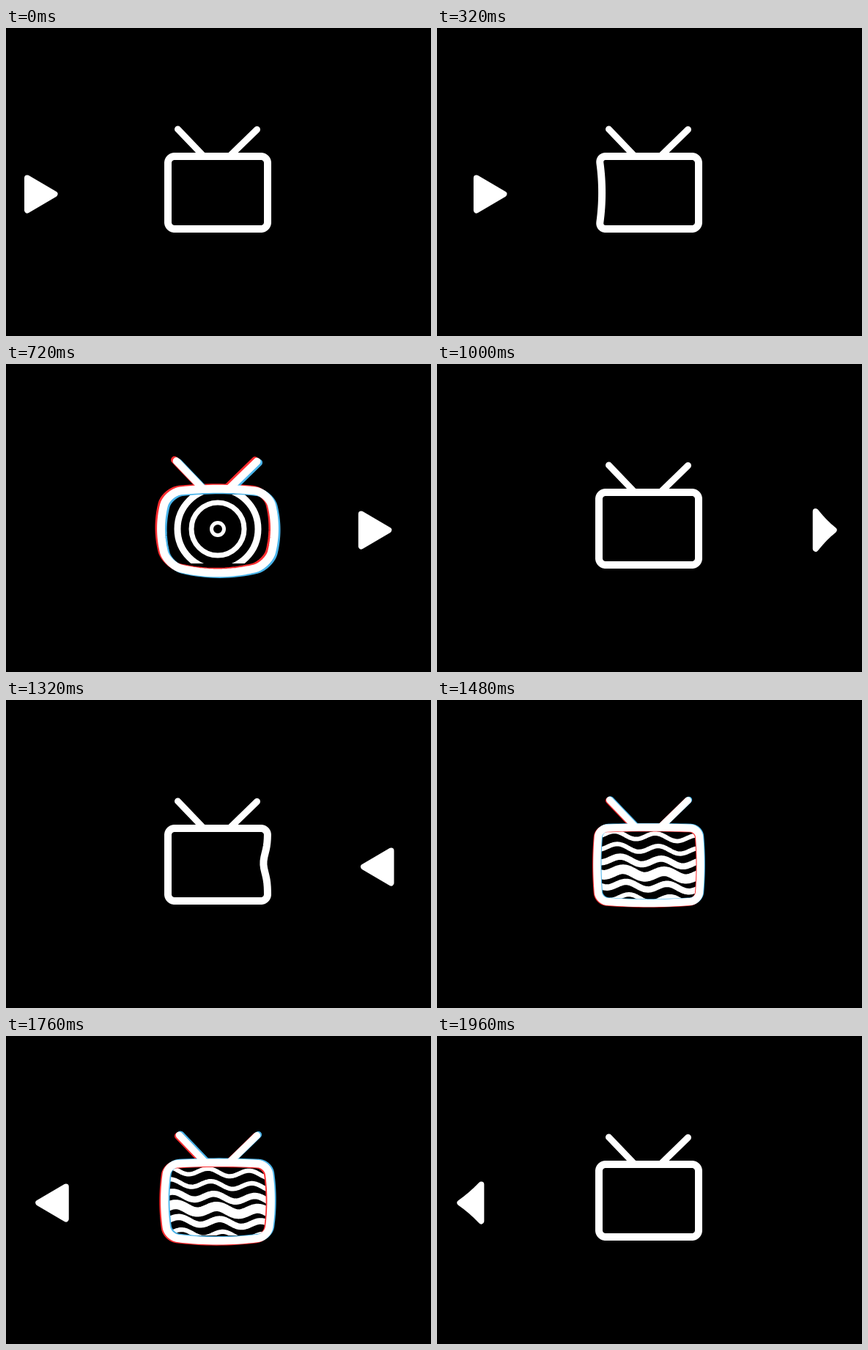
An HTML page with a canvas that plays this animation: 580 px wide and 420 px high, repeating every 2000 ms.

```html
<!DOCTYPE html>
<html lang="en">
<head>
<meta charset="utf-8">
<title>Play and television</title>
<style>
  html, body { margin: 0; width: 100%; height: 100%; overflow: hidden; background: #000; }
  canvas { display: block; }
</style>
</head>
<body>
<canvas id="stage" width="580" height="420"></canvas>
<script>
const ctx = document.getElementById('stage').getContext('2d');
const LOOP = 2000, STEP = 40, HALF = 1000, TURN = 160;
const CX = 289, CY = 224.5, HW = 68, HH = 49.5;

// The crossing to the right and the way back
const LEGS = [
  { dir: 1, x: 47.75, span: 482, y: 226.5, turn: 957, peak: 1.12, dent: 8, screen: drawRings },
  { dir: -1, x: 532, span: -489, y: 227.5, turn: 925, peak: .68, dent: 11, screen: drawWaves }
];

const clamp = v => Math.min(1, Math.max(0, v));

function ramp(from, to, t) {
  const s = clamp((t - from) / (to - from));
  return s * s * (3 - 2 * s);
}

// Slow drift plus a sharp dash with a softer stop
function travel(t) {
  const d = t - 470;
  const dash = d < 0 ? .476 * Math.exp(d / 47) : .9 - .424 * Math.exp(-d / 90);
  return t / 10000 + dash;
}

function drawPlay(leg, t) {
  const u = clamp((t - leg.turn) / TURN);
  const swell = Math.sin(Math.PI * u);
  const w = 18.75 * Math.cos(Math.PI * u) * leg.dir;
  const h = 22 * (1 + .21 * swell);
  const x = leg.x + leg.span * travel(t), y = leg.y;
  const pull = 4 * swell;
  ctx.beginPath();
  ctx.moveTo(x - w, y - h);
  ctx.quadraticCurveTo(x, y - h / 2 + pull, x + w, y);
  ctx.quadraticCurveTo(x, y + h / 2 - pull, x - w, y + h);
  ctx.closePath();
  ctx.lineWidth = 8;
  ctx.fill();
  ctx.stroke();
}

// Moves a point of the resting frame by the bulge and by the dent on the near side
function warp(x, y, leg, bulge, dent) {
  const u = x / HW, v = y / HH;
  const near = Math.max(0, -u * leg.dir);
  const bell = leg.dir > 0 ? 1 - v * v : Math.exp(-Math.pow((y + 2) / 19, 2));
  return [
    CX + x + 10 * bulge * u * (1 - v * v) + leg.dir * dent * near * bell,
    CY + y + (v < 0 ? 5 : 11.5) * bulge * v * (1 - u * u)
  ];
}

function framePath(leg, bulge, dent) {
  const r = 9 + 9 * bulge, arc = 10, cuts = 16;
  const points = [];
  [[1, -1], [1, 1], [-1, 1], [-1, -1]].forEach(([sx, sy], k) => {
    for (let i = 0; i <= arc; i++) {
      const a = (k - 1 + i / arc) * Math.PI / 2;
      points.push([sx * (HW - r) + r * Math.cos(a), sy * (HH - r) + r * Math.sin(a)]);
    }
  });
  const path = new Path2D();
  points.forEach(([x, y], i) => {
    const [nx, ny] = points[(i + 1) % points.length];
    for (let j = 0; j < cuts; j++) {
      const s = j / cuts;
      path.lineTo(...warp(x + (nx - x) * s, y + (ny - y) * s, leg, bulge, dent));
    }
  });
  path.closePath();
  return path;
}

function drawRings(t) {
  const grow = (t - 720) * .06;
  [8.5, 36, 55, 80].forEach((base, i) => {
    const r = base + grow * (.4 + base / 60);
    if (r <= 1) return;
    ctx.beginPath();
    ctx.arc(CX, 225, r, 0, 2 * Math.PI);
    ctx.lineWidth = 5 + 2 * i;
    ctx.stroke();
  });
}

function drawWaves(t) {
  const shift = (t - 640) * .12;
  for (let i = 0; i < 6; i++) {
    ctx.beginPath();
    for (let x = 210; x <= 370; x += 2) {
      const a = (x - 262 - shift - 4 * i) / 56 * 2 * Math.PI;
      ctx.lineTo(x, 186 + 17 * i - 4.5 * Math.cos(a) + (x - CX) * .05);
    }
    ctx.lineWidth = 6 + 7 * Math.exp(-Math.pow(i - 3, 2));
    ctx.stroke();
  }
}

function drawScreen(leg, t, shape) {
  ctx.save();
  ctx.clip(shape);
  ctx.fillStyle = '#000';
  ctx.fillRect(0, 0, 580, 420);
  ctx.beginPath();
  ctx.rect(200, 178, 180, 94);
  ctx.clip();
  if (t >= 460 && t < 900) leg.screen(t);
  ctx.restore();
}

function drawSet(leg, bulge, shape) {
  const sway = bulge * (leg.dir > 0 ? -2 : 4), lift = 6 * bulge;
  const layer = (color, dx, dy) => {
    ctx.save();
    ctx.translate(dx, dy);
    ctx.strokeStyle = color;
    ctx.lineWidth = 9 + bulge;
    ctx.beginPath();
    ctx.moveTo(234.5 + sway, 138 - lift);
    ctx.lineTo(269 + sway, 174 - lift);
    ctx.moveTo(342.5, 138.5 - lift);
    ctx.lineTo(306, 174 - lift);
    ctx.stroke();
    ctx.lineWidth = 10 + bulge;
    ctx.stroke(shape);
    ctx.restore();
  };
  const split = 2.6 * Math.min(1, 1.5 * bulge), tilt = .6 * split * leg.dir;
  if (split > .1) {
    layer('#ff2d30', -split, -tilt);
    layer('#4ab4ea', split, tilt);
  }
  layer('#fff', 0, 0);
}

function draw(now) {
  const t = Math.floor(now % LOOP / STEP) * STEP;
  const way = t < HALF ? 0 : 1;
  const leg = LEGS[way], tau = t - way * HALF;
  // The turn at the right end runs a little into the way back
  const turning = way && tau < LEGS[0].turn + TURN - HALF;
  const bulge = leg.peak * ramp(420, 560, tau) * (1 - ramp(640, 960, tau));
  const dent = leg.dent * Math.pow(Math.min(tau, 400) / 400, 3) * (1 - ramp(400, 460, tau));
  const shape = framePath(leg, bulge, dent);

  ctx.fillStyle = '#000';
  ctx.fillRect(0, 0, 580, 420);
  ctx.fillStyle = ctx.strokeStyle = '#fff';
  ctx.lineJoin = ctx.lineCap = 'round';
  if (turning) drawPlay(LEGS[0], t);
  else drawPlay(leg, tau);
  drawScreen(leg, tau, shape);
  drawSet(leg, bulge, shape);
}

const start = performance.now();
function tick() {
  draw(performance.now() - start);
  requestAnimationFrame(tick);
}
tick();
</script>
</body>
</html>
```
